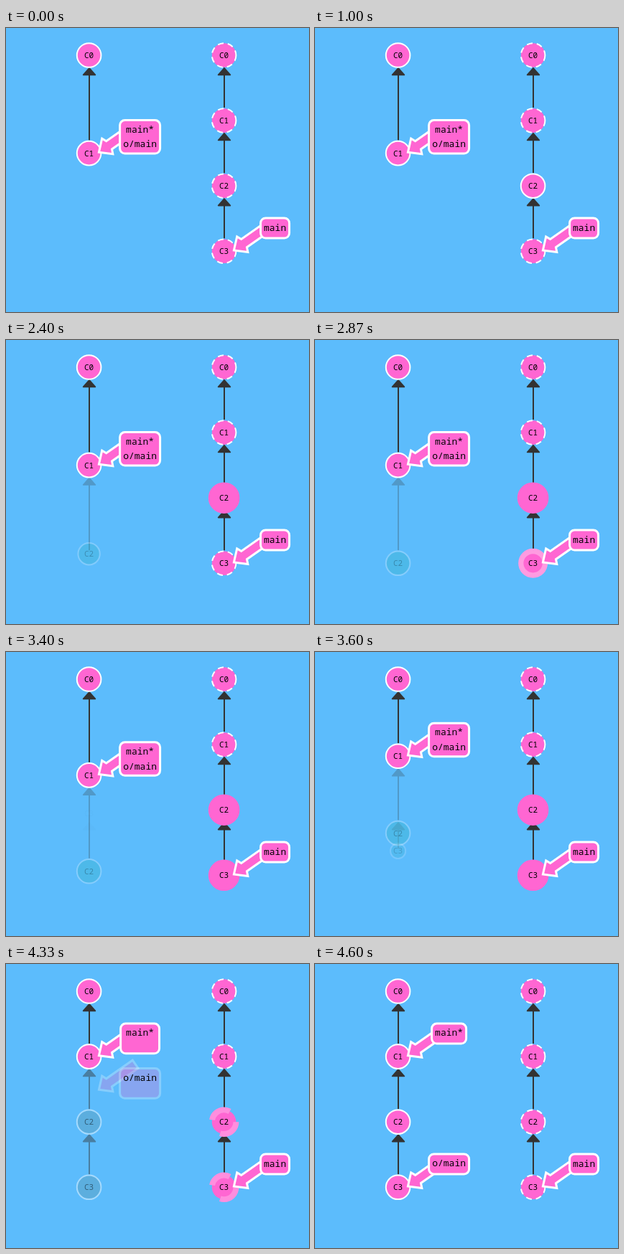
These frames come from a looping animation (422 px wide and 396 px high, 6610 ms). An HTML page:

```html
<!DOCTYPE html>
<html lang="en">
<head>
<meta charset="utf-8">
<title>Fetching commits</title>
<style>
  html, body { margin: 0; width: 100%; height: 100%; overflow: hidden; background: #5cbcfc; }
  svg { display: block; width: 422px; height: 396px; }
  text { font-family: "Noto Sans Mono", "DejaVu Sans Mono", monospace; text-anchor: middle; fill: #000; }
  .id { font-size: 11px; }
  .name { font-size: 13px; }
  .edge path { stroke: #333; fill: none; stroke-width: 2; }
  .edge .head { fill: #333; stroke-width: 1.6; stroke-linejoin: round; }
  .tag { fill: #ff66d2; stroke: #fff; stroke-width: 3; }
</style>
</head>
<body>
<svg id="stage" viewBox="0 0 422 396"></svg>
<script>
const LOOP = 6610, FPS = 15;
const LEFT = 115.6, RIGHT = 303.6;
const ROW = [38, 129.1, 220.2, 311.3];
const LOW = 174.6;              // second row while the left tree is short
const R = 16.8, THIN = 2, THICK = 10;
const PINK = [255, 102, 210], TEAL = [36, 179, 179], WHITE = [255, 255, 255];
const FAINT = 0.25;

const stage = document.getElementById('stage');

const set = (el, attrs) => {
  for (const k in attrs) el.setAttribute(k, attrs[k]);
  return el;
};
const add = (parent, tag, attrs = {}) =>
  parent.appendChild(set(document.createElementNS('http://www.w3.org/2000/svg', tag), attrs));

const lerp = (a, b, p) => a + (b - a) * p;
const mix = (a, b, p) => `rgb(${a.map((v, i) => Math.round(lerp(v, b[i], p))).join()})`;
const span = (t, start, length) => Math.min(1, Math.max(0, (t - start) / length));

// cubic-bezier(.42, 0, .58, 1)
function ease(n) {
  let lo = 0, hi = 1;
  for (let i = 0; i < 24; i++) {
    const m = (lo + hi) / 2, k = 1 - m;
    if (1.26 * m * k * k + 1.74 * m * m * k + m * m * m < n) lo = m; else hi = m;
  }
  return n <= 0 ? 0 : n >= 1 ? 1 : lo * lo * (3 - 2 * lo);
}

function bounce(n) {
  const s = 7.5625, d = 2.75;
  if (n < 1 / d) return s * n * n;
  if (n < 2 / d) return s * (n - 1.5 / d) ** 2 + 0.75;
  if (n < 2.5 / d) return s * (n - 2.25 / d) ** 2 + 0.9375;
  return s * (n - 2.625 / d) ** 2 + 0.984375;
}

function makeEdge(x) {
  const g = add(stage, 'g', { class: 'edge' });
  const line = add(g, 'path');
  const head = add(g, 'path', { class: 'head' });
  return (top, end, opacity = 1) => {
    const cx = x + 0.4, y = top + 17.8, base = top + 27.4;
    set(line, { d: `M${cx} ${y + 2}V${Math.max(end, y + 2)}` });
    set(head, { d: `M${cx} ${y}L${cx + 8.4} ${base}H${cx - 8.4}Z` });
    set(g, { opacity });
  };
}

function makeNode(x, label) {
  const disc = add(stage, 'circle', { cx: x, r: R });
  const text = add(stage, 'text', { class: 'id', x });
  text.textContent = label;
  return (y, o = {}) => {
    const { r = R, width = THIN, fill = mix(PINK, PINK, 0), stroke = '#fff', dashed = false, opacity = 1 } = o;
    set(disc, {
      cy: y, r, fill, stroke, opacity, 'stroke-width': width,
      'stroke-dasharray': dashed ? `${4 * width} ${3 * width}` : 'none'
    });
    set(text, { y: y + 4, opacity });
  };
}

// Arrow outline in its own axis: tip at the origin, shaft to the right.
const ARROW = 'M0 0L14.5 -13.2L17.3 -6.8H62V6.8H17.3L14.5 13.2Z';

function makeTag(x, label) {
  const arrow = add(stage, 'path', { class: 'tag', d: ARROW });
  const box = add(stage, 'rect', { class: 'tag', rx: 7 });
  const text = add(stage, 'text', { class: 'name', x: x + 71 });
  text.textContent = label;
  return {
    label: text,
    arrow(y, opacity = 1) {
      set(arrow, { transform: `translate(${x + 13.8} ${y - 1.3}) rotate(-35)`, opacity });
    },
    box(top, w, h, opacity = 1) {
      set(box, { x: x + 71 - w / 2, y: top, width: w, height: h, opacity });
    },
    text(y) {
      set(text, { y: y + 4 });
    }
  };
}

const edgeL = [0, 1, 2].map(() => makeEdge(LEFT));
const edgeR = [0, 1, 2].map(() => makeEdge(RIGHT));
const nodeL = [3, 2, 1, 0].map(i => makeNode(LEFT, 'C' + i)).reverse();
const nodeR = [0, 1, 2, 3].map(i => makeNode(RIGHT, 'C' + i));
const remote = makeTag(LEFT, 'o/main');
const local = makeTag(LEFT, 'main*');
const origin = makeTag(RIGHT, 'main');
stage.append(remote.label);     // its text stays above the other box

// Right tree: only highlights of the lower two commits change.
ROW.forEach((y, i) => {
  nodeR[i](y, { dashed: true });
  if (i) edgeR[i - 1](ROW[i - 1], y - 18);
});
origin.arrow(ROW[3]);
origin.box(ROW[3] - 46.3, 40, 28);
origin.text(ROW[3] - 32.8);
nodeL[0](ROW[0]);

const GLOW = [990, 2585], GLOW_TIME = 475;
const BIRTH = [1722, 3316], MOVE_TIME = 485, BOUNCE_TIME = 985;
const SETTLE = 4183, SETTLE_TIME = 425;

function glow(t, row, start, settle) {
  const on = ease(span(t, start, GLOW_TIME));
  const p = on * (1 - settle);
  nodeR[row](ROW[row], {
    width: lerp(THIN, THICK, p),
    stroke: mix(WHITE, PINK, p),
    dashed: t < start || t >= SETTLE
  });
}

function born(row, y, grow, settle) {
  nodeL[row](y, {
    r: R * grow,
    fill: mix(TEAL, PINK, settle),
    opacity: lerp(FAINT * grow, 1, settle)
  });
}

function draw(t) {
  const settle = ease(span(t, SETTLE, SETTLE_TIME));
  glow(t, 2, GLOW[0], settle);
  glow(t, 3, GLOW[1], settle);

  const in2 = ease(span(t, BIRTH[0], MOVE_TIME));
  const in3 = ease(span(t, BIRTH[1], MOVE_TIME));
  const hop2 = bounce(span(t, BIRTH[0], BOUNCE_TIME));
  const hop3 = bounce(span(t, BIRTH[1], BOUNCE_TIME));

  const y1 = lerp(LOW, ROW[1], in3);
  const y2 = lerp(lerp(LOW, ROW[3], hop2), ROW[2], in3);
  const y3 = lerp(ROW[2], ROW[3], hop3);

  nodeL[1](y1);
  born(2, y2, hop2, settle);
  born(3, y3, hop3, settle);

  const end2 = lerp(lerp(LOW + 18, ROW[3] - 18, in2), ROW[2] - 18, in3);
  edgeL[0](ROW[0], y1 - 18);
  edgeL[1](y1, end2, lerp(FAINT * in2, 1, settle));
  edgeL[2](ROW[2], lerp(ROW[2] + 18, ROW[3] - 18, in3), lerp(FAINT * in3, 1, settle));

  local.arrow(y1);
  local.box(y1 - 46, lerp(56, 48, settle), lerp(46.5, 28, settle));
  local.text(y1 - 32.8);

  const yr = lerp(y1, ROW[3], settle);
  remote.arrow(yr, settle);
  remote.box(lerp(y1 - 25.7, ROW[3] - 46.3, settle), 56, lerp(46.5, 28, settle), settle);
  remote.text(lerp(y1 - 12.2, ROW[3] - 32.8, settle));
}

// Steps at a fixed rate; the small lead absorbs rounding to 10 ms.
const begin = performance.now();
function tick() {
  const t = (performance.now() - begin) % LOOP;
  draw(Math.floor((t + 4) * FPS / 1000) * 1000 / FPS);
  requestAnimationFrame(tick);
}
tick();
</script>
</body>
</html>
```
